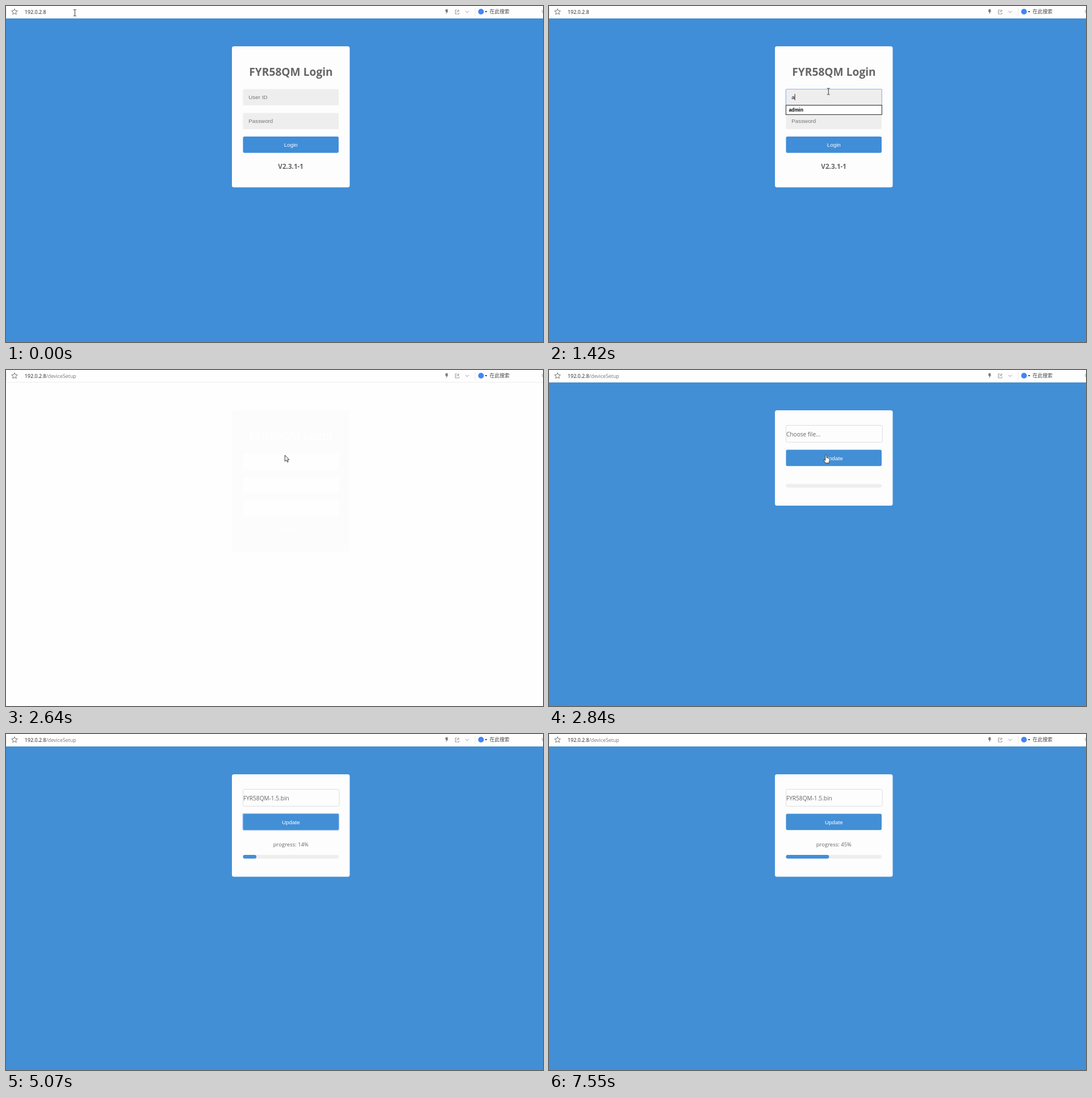
Write an HTML page that moves like this. It is 946 px wide and 592 px high and loops after 8000 ms.

```html
<!DOCTYPE html>
<html lang="en">
<head>
<meta charset="utf-8">
<title>Device login and update</title>
<style>
html, body { margin: 0; width: 100%; height: 100%; overflow: hidden; background: #fefefe; }
svg { display: block; width: 100%; height: 100%; --blue: #408dd8; }
svg.update { --blue: #428fd6; }
text { font-family: "Open Sans", "Noto Sans", sans-serif; fill: #666; white-space: pre; }
.arial { font: 9.8px "Liberation Sans", Arial, sans-serif; }
.hint { fill: #757575; }
.typed { fill: #111; }
.label { fill: #fff; text-anchor: middle; }
.mid { text-anchor: middle; }
.bold { font-weight: 700; }
.page, .btn, #bar { fill: var(--blue); }
.card { fill: #fdfdfd; }
.field { fill: #eee; }
.line { fill: none; stroke: #8d8d8d; stroke-width: .9; }
.ring { fill: none; stroke: #8fb3f2; stroke-width: 1.2; }
.hidden { display: none; }
.ghost .page { fill: #fefefe; }
.ghost .card { fill: #fcfcfc; }
.ghost .field, .ghost .btn { fill: #fefefe; }
.ghost #login text { fill: #fefefe; }
</style>
</head>
<body>
<svg id="stage" viewBox="0 0 946 592" preserveAspectRatio="none">
  <rect class="page" y="22" width="946" height="570"/>

  <g id="toolbar">
    <rect width="946" height="22" fill="#fefefe"/>
    <path d="M0 21.5H946" stroke="#eee"/>
    <path d="M826.5 3V18M.5 3V18" stroke="#e8e8e8"/>
    <path id="star" fill="none" stroke="#666" stroke-width=".9" stroke-linejoin="round"/>
    <text x="33" y="13.5" font-size="8.9"><tspan fill="#222">192.0.2.8</tspan><tspan id="path" fill="#777"></tspan></text>
    <path d="M774.6 5.8h4l-1.1 3h1.6l-4 5.7.8-4.2h-2z" fill="#777"/>
    <path class="line" d="M794.5 7H791.5V14H798V11.5M793.8 11.5Q794 8.2 798 8.2M796 6.2L798.3 8.2 796 10.2"/>
    <path class="line" d="M809.3 8.8L812.3 11.6 815.3 8.8"/>
    <circle cx="836.8" cy="10" r="5" fill="#4285f4"/>
    <path d="M843.6 9h4.2l-2.1 2.4z" fill="#333"/>
    <text x="852" y="13.2" font-size="8.75" style="font-family:'Noto Sans CJK SC','Noto Sans CJK',sans-serif;fill:#444">在此搜索</text>
    <circle class="line" cx="947.5" cy="9.5" r="3"/>
  </g>

  <g id="login">
    <rect class="card" x="398" y="71" width="207.5" height="248.5" rx="3.5"/>
    <text class="mid bold" x="502" y="122.8" font-size="19.2">FYR58QM Login</text>
    <rect class="field" x="417.5" y="146.5" width="168.5" height="28.5" rx="2.6"/>
    <rect class="field" x="417.5" y="188.5" width="168.5" height="28.5" rx="2.6"/>
    <rect id="focus" class="ring" x="417.3" y="146.5" width="169" height="28.5" rx="1.5"/>
    <text id="user" class="arial" x="427.3" y="164"></text>
    <text id="pass" class="arial" x="427.3" y="206"></text>
    <path id="caret" stroke="#111" stroke-width=".9"/>
    <rect class="btn" x="417.5" y="230" width="168.5" height="28.7" rx="2.6"/>
    <text class="arial label" x="501.8" y="247.8">Login</text>
    <text class="mid bold" x="501.7" y="287" font-size="11.7">V2.3.1-1</text>
    <g id="suggest">
      <rect x="417.4" y="174.9" width="169" height="16.4" fill="#fefefe" stroke="#222"/>
      <text class="arial bold" x="422.5" y="186.3" style="font-size:8.7px;font-weight:700;fill:#000">admin</text>
    </g>
  </g>

  <g id="update">
    <rect id="panel" class="card" x="398" y="71" width="207.5" rx="3.5"/>
    <rect x="417.5" y="97.5" width="169.7" height="29.8" rx="2.6" fill="#fdfdfd" stroke="#ddd"/>
    <text id="file" x="418" y="116.5" font-size="10.1"></text>
    <rect class="btn" x="417.5" y="140.5" width="168.5" height="28.7" rx="2.6"/>
    <rect id="pressed" class="ring" x="417.2" y="140.3" width="169.2" height="29" rx="2"/>
    <text class="arial label" x="501.8" y="158.8">Update</text>
    <text id="status" class="mid" x="501.8" y="198.3" font-size="9.5"></text>
    <rect id="track" class="field" x="417.5" width="168.5" height="6.6" rx="3.3"/>
    <rect id="bar" x="417.5" height="6.6" rx="3.3"/>
  </g>

  <g id="pointer">
    <path id="beam" d="M-2.5-5.5H-1Q0-5.5 0-4.5 0-5.5 1-5.5H2.5M0-4.5V4.5M-2.5 5.5H-1Q0 5.5 0 4.5 0 5.5 1 5.5H2.5" fill="none" stroke="#333"/>
    <path id="arrow" d="M0 0V11L2.6 8.7 4.4 12.4 6 11.6 4.3 8H7.5Z" fill="#fff" stroke="#222" stroke-width=".9"/>
    <path id="hand" d="M-1.2 1.3Q0-.6 1.2 1.3V5.7L4.8 6.6Q6.4 7 6.3 8.6L6 11.8 4.8 15.3H-.8L-3.6 11.2Q-4.6 9.2-2.8 9.3L-1.2 10.7Z" fill="#fff" stroke="#222" stroke-width=".9"/>
  </g>
</svg>
<script>
const LOOP = 8000;
const TRACK = 168.5;
const $ = id => document.getElementById(id);
const show = (id, on) => $(id).classList.toggle('hidden', !on);
const set = (id, attrs) => {
  for (const name in attrs) $(id).setAttribute(name, attrs[name]);
};

const at = (shape, x, y) => ({ cursor: { shape, x, y } });

// Each step keeps everything from the steps before it.
const steps = [
  [0, { page: 'login', focus: '', user: '', pass: '', suggest: false,
        file: 'Choose file...', progress: null, pressed: false, ...at('beam', 121.3, 12) }],
  [200, at('arrow', 205, 52)],
  [400, at('arrow', 388, 138)],
  [600, at('beam', 484.5, 174)],
  [800, at('beam', 492.3, 150.5)],
  [1010, { focus: 'user' }],
  [1420, { user: 'a', suggest: true }],
  [1620, { user: 'adm' }],
  [1830, { user: 'admin' }],
  [2030, { focus: 'pass', suggest: false }],
  [2240, { pass: '•••' }],
  [2440, { pass: '•••••' }],
  [2640, { page: 'ghost', focus: '', user: '', pass: '', ...at('arrow', 491.3, 150) }],
  [2840, { page: 'update', ...at('hand', 488, 148.7) }],
  [3050, at('hand', 487, 134)],
  [3260, at('hand', 486, 112)],
  [3460, at('arrow', 610, 250)],
  [3670, at('arrow', 745, 380)],
  [3870, at('arrow', 850, 480)],
  [4070, at('arrow', 919, 544)],
  [4270, { file: 'FYR58QM-1.5.bin', ...at('arrow', 790, 420) }],
  [4480, at('arrow', 610, 255)],
  [4670, at('hand', 509.5, 162.5)],
  [4860, { pressed: true, progress: 14 }],
  [5070, { cursor: null }],
  [5880, { pressed: false, progress: 17 }],
  [6100, { progress: 20 }],
  [6520, { progress: 24 }],
  [7130, { progress: 28 }],
  [7550, { progress: 45 }],
];

function drawInput(id, value, hint) {
  $(id).textContent = value || hint;
  $(id).setAttribute('class', 'arial ' + (value ? 'typed' : 'hint'));
}

function drawLogin(s) {
  drawInput('user', s.user, 'User ID');
  drawInput('pass', s.pass, 'Password');
  show('suggest', s.suggest);
  show('focus', s.focus);
  show('caret', s.focus);
  if (!s.focus) return;
  const top = s.focus === 'user' ? 146.5 : 188.5;
  const width = s[s.focus] ? $(s.focus).getComputedTextLength() : 0;
  set('focus', { y: top });
  set('caret', { d: `M${427.7 + width} ${top + 8.5}v11` });
}

function drawUpdate(s) {
  const running = s.progress !== null;
  const y = running ? 213 : 200.7;
  $('file').textContent = s.file;
  $('status').textContent = running ? `progress: ${s.progress}%` : '';
  set('panel', { height: running ? 180.5 : 168 });
  set('track', { y });
  set('bar', { y, width: TRACK * (s.progress || 0) / 100 });
  show('pressed', s.pressed);
}

function drawCursor(cursor) {
  show('pointer', cursor);
  if (!cursor) return;
  for (const shape of ['beam', 'arrow', 'hand']) show(shape, shape === cursor.shape);
  set('pointer', { transform: `translate(${cursor.x} ${cursor.y})` });
}

function draw(s) {
  const updating = s.page === 'update';
  $('stage').setAttribute('class', s.page);
  $('path').textContent = s.page === 'login' ? '' : '/deviceSetup';
  show('login', !updating);
  show('update', updating);
  if (updating) drawUpdate(s); else drawLogin(s);
  drawCursor(s.cursor);
}

const spikes = Array.from({ length: 10 }, (_, i) => {
  const r = i % 2 ? 2.5 : 5.5;
  const a = i * Math.PI / 5 - Math.PI / 2;
  return `${15 + r * Math.cos(a)} ${10.3 + r * Math.sin(a)}`;
});
set('star', { d: `M${spikes.join('L')}Z` });

const start = performance.now();
let shown = 0;
function tick() {
  const time = (performance.now() - start) % LOOP;
  const count = steps.filter(([from]) => from <= time).length;
  if (count !== shown) {
    shown = count;
    draw(Object.assign({}, ...steps.slice(0, count).map(([, change]) => change)));
  }
  requestAnimationFrame(tick);
}
tick();
</script>
</body>
</html>
```
